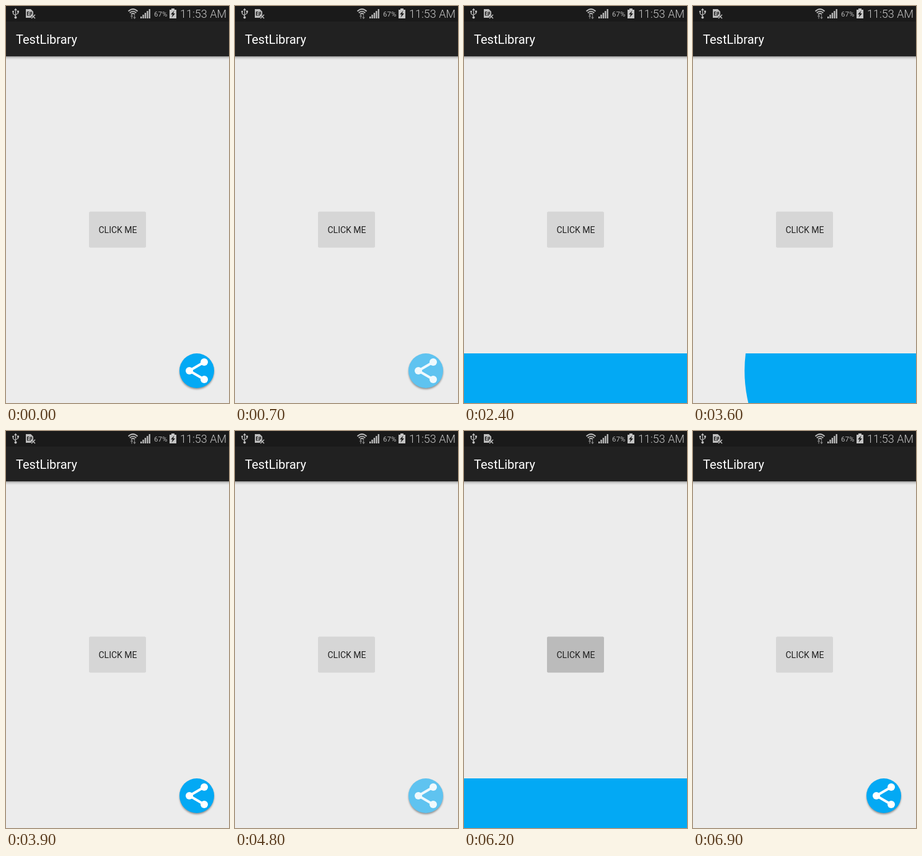
Recreate the animation shown at these times as an HTML page. Size 360 by 640 pixels, loop 8100 ms.

```html
<!DOCTYPE html>
<html lang="en">
<head>
<meta charset="utf-8">
<title>Toolbar reveal</title>
<style>
  html, body { margin: 0; width: 100%; height: 100%; overflow: hidden; background: #ececec; }
  svg { display: block; width: 360px; height: 640px; }
  text { font-family: Roboto, sans-serif; }
</style>
</head>
<body>
<svg viewBox="0 0 360 640">
  <defs>
    <linearGradient id="barShadow" x2="0" y2="1">
      <stop offset="0" stop-color="#000" stop-opacity=".4"/>
      <stop offset=".4" stop-color="#000" stop-opacity=".13"/>
      <stop offset="1" stop-color="#000" stop-opacity="0"/>
    </linearGradient>
    <filter id="blur" x="-30%" y="-30%" width="160%" height="160%">
      <feGaussianBlur stdDeviation="1.7"/>
    </filter>
    <clipPath id="toolbar"><rect y="560" width="360" height="80"/></clipPath>
  </defs>

  <rect width="360" height="640" fill="#ececec"/>
  <rect y="81" width="360" height="6" fill="url(#barShadow)"/>
  <rect width="360" height="81" fill="#212121"/>
  <rect width="360" height="25" fill="#1a1a1a"/>
  <text x="16" y="61" font-size="20" fill="#fff">TestLibrary</text>

  <!-- status bar -->
  <g fill="none" stroke="#bdbdbd" stroke-width="1.2">
    <path d="M15.5 6V18M11.5 9V12.5L15.5 15.5M19.5 8.5V12L15.5 14"/>
    <g fill="#bdbdbd" stroke="none">
      <path d="M15.5 3.5L18 7H13Z"/>
      <circle cx="15.5" cy="18.5" r="2"/>
      <circle cx="11.5" cy="9" r="1.5"/>
      <path d="M18 7.5h3v3h-3z"/>
      <path d="M32 5h8l4 4v5l-4 5h-8z"/>
    </g>
    <path d="M34 9.5h3.5M34 12h3M34 15h3.5M34.5 9.5v6M39 10h2.5v3H39M39 10v6" stroke="#1a1a1a"/>
    <path d="M41 14l6 6M47 14l-6 6" stroke-width="1.5"/>
    <path d="M197.500 8.500Q205 1.500 212.500 8.500M199.800 11Q205 6.200 210.200 11M202 13.300Q205 10.700 208 13.300" stroke-width="1.8"/>
    <path d="M203 20.500V15M201.300 17L203 14.800L204.700 17M207.500 14.500V20M205.800 18L207.500 20.200L209.200 18" stroke="#858585"/>
  </g>
  <g id="signal" fill="#bdbdbd"></g>
  <text x="239" y="17" font-size="11.5" fill="#b4b4b4">67%</text>
  <path d="M267 4h5v2h3v14h-11V6h3z" fill="#c4c4c4"/>
  <path d="M271.500 7.500L266 13.500H269L267.500 18.500L273 12H270Z" fill="#1a1a1a"/>
  <text x="356" y="18.500" font-size="18" font-weight="300" text-anchor="end" fill="#c6c6c6">11:53 AM</text>

  <rect id="button" x="134" y="331.500" width="92" height="58" rx="2"/>
  <text x="180.500" y="366" font-size="14" text-anchor="middle" fill="#202020">CLICK ME</text>

  <circle cx="308" cy="590" r="27.800" fill="#000" opacity=".4" filter="url(#blur)"/>
  <circle id="fab" cx="308" cy="588" r="28"/>
  <g id="share" fill="#fff">
    <path d="M320 574L296 588L320 602" fill="none" stroke="#fff" stroke-width="4"/>
    <circle cx="320" cy="574" r="6"/>
    <circle cx="296" cy="588" r="6"/>
    <circle cx="320" cy="602" r="6"/>
  </g>
  <circle id="reveal" cx="308" cy="588" fill="#03a9f4" clip-path="url(#toolbar)"/>
</svg>
<script>
const LOOP = 8100, STEP = 100, DURATION = 500, FULL_RADIUS = 360;
const $ = id => document.getElementById(id);

$("signal").innerHTML = [3, 6, 9, 12, 15].map((h, i) =>
  `<rect x="${217 + i * 3.4}" y="${20 - h}" width="2.3" height="${h}"/>`).join("");

const fabPresses = [[700, 2000], [4800, 5100]];
const buttonPresses = [[3100, 3400], [6200, 6400]];
// open: start of growth; close: first visible shrink step; end: back at rest
const reveals = [
  { open: 2000, close: 3600, end: 3900 },
  { open: 5100, close: 6600, end: 6900 }
];
const CLOSE_LEAD = 210;

const within = (t, spans) => spans.some(([a, b]) => t >= a && t < b);
const ease = p => 0.5 - Math.cos(Math.PI * Math.min(1, Math.max(0, p))) / 2;

function radiusAt(t) {
  const span = reveals.find(r => t >= r.open && t < r.end);
  if (!span) return 0;
  const grown = t < span.close
    ? ease((t - span.open) / DURATION)
    : 1 - ease((t - span.close + CLOSE_LEAD) / DURATION);
  return FULL_RADIUS * grown;
}

function draw() {
  const t = Math.floor(performance.now() % LOOP / STEP) * STEP;
  const fabDown = within(t, fabPresses);
  $("fab").setAttribute("fill", fabDown ? "#5fc3f0" : "#03a9f4");
  $("share").setAttribute("opacity", fabDown ? 0.9 : 1);
  $("button").setAttribute("fill", within(t, buttonPresses) ? "#bbb" : "#d6d6d6");
  $("reveal").setAttribute("r", radiusAt(t));
  requestAnimationFrame(draw);
}
draw();
</script>
</body>
</html>
```
